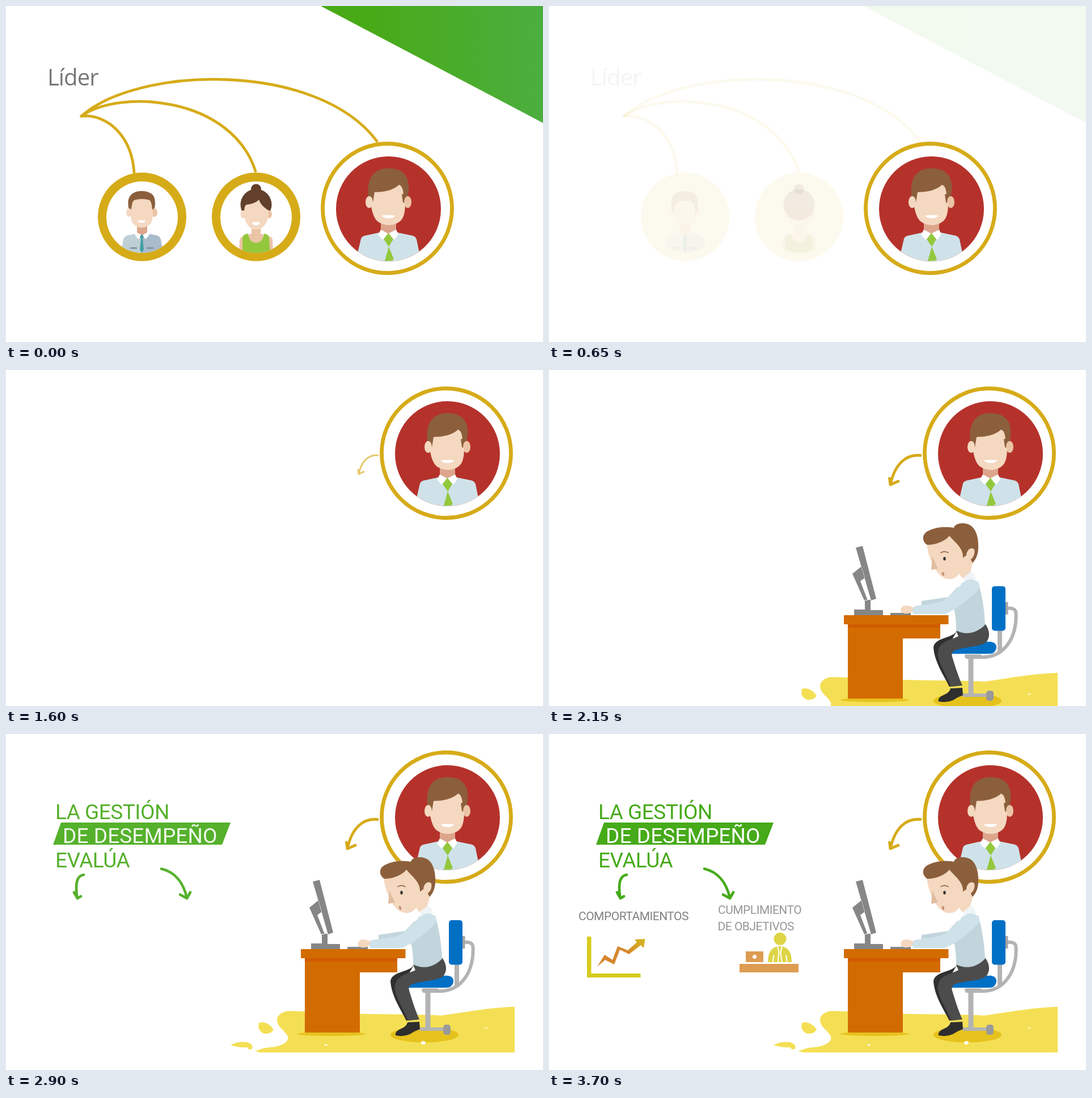
An HTML page for the animation above (3750 ms loop, 947 by 592 pixels).

```html
<!DOCTYPE html>
<html lang="es">
<head>
<meta charset="utf-8">
<title>Gestión de desempeño</title>
<style>
  html, body { margin: 0; width: 100%; height: 100%; overflow: hidden; background: #fff; }
  svg { display: block; width: 947px; height: 592px; }
  .each :not(g) { opacity: var(--o, 1); }
  .line { fill: none; stroke-linecap: round; stroke-linejoin: round; }
  .gold { fill: #d6ab18; }
  .gold.line { fill: none; stroke: #d6ab18; stroke-width: 4.8; }
  .green { fill: #46aa19; }
  .green.line { fill: none; stroke: #46aa19; stroke-width: 4.6; }
  .white { fill: #fff; }
  .skin { fill: #f4d8c0; }
  .ear { fill: #ebc4a6; }
  .neck { fill: #dca58c; }
  .hair { fill: #8c5f3c; }
  .lime { fill: #93c83d; }
  .shirt { fill: #cfe2e9; }
  .fold { fill: #c2d5dc; }
  .desk { fill: #d36c00; }
  .metal { fill: #868686; }
  .blue { fill: #0070c5; }
  .tube { stroke: #b3b3b3; }
  .floor { fill: #f4df54; }
  .shade { fill: #e6c21c; }
  .orange { fill: #d6872d; }
  .yellow { fill: #d6cb1e; }
  text { font-family: Roboto, "Open Sans", sans-serif; }
  .lead { font: 40px "Open Sans", "Noto Sans", sans-serif; letter-spacing: -.9px; fill: #777; }
  .head { font-size: 37px; letter-spacing: -.5px; }
  .head.white { letter-spacing: .1px; }
  .label { font-size: 21px; letter-spacing: -.5px; fill: #808080; }
</style>
</head>
<body>
<svg viewBox="0 0 947 592">
  <defs>
    <linearGradient id="leaf" gradientUnits="userSpaceOnUse" x1="640" y1="0" x2="947" y2="0">
      <stop stop-color="#48aa17"/><stop offset="1" stop-color="#4cae3f"/>
    </linearGradient>
    <linearGradient id="rise" gradientUnits="userSpaceOnUse" x1="135" y1="385" x2="169" y2="361">
      <stop stop-color="#d6872d"/><stop offset="1" stop-color="#d6b81e"/>
    </linearGradient>
    <clipPath id="clipA"><circle cx="240" cy="372" r="63"/></clipPath>
    <clipPath id="clipB"><circle cx="441" cy="372" r="63"/></clipPath>
    <clipPath id="clipC"><circle cx="674.5" cy="357.5" r="92.5"/></clipPath>
  </defs>

  <g id="team" class="each">
    <path fill="url(#leaf)" d="M555 0H947V206Z"/>
    <text class="lead" x="73" y="140">Líder</text>
    <path class="gold line" d="M133 194C180 190 222 230 226 294"/>
    <path class="gold line" d="M133 194C200 146 397 158 440 291"/>
    <path class="gold line" d="M133 194C233 105 548 97 654 238"/>

    <circle class="gold" cx="240" cy="371.5" r="78"/>
    <circle class="white" cx="240" cy="372" r="63"/>
    <g clip-path="url(#clipA)">
      <path class="hair" d="M219 366C214 352 215 342 217 338C221 329 230 326 239 326C250 326 260 330 262 339C264 347 263 357 259 366L256 350L250 343H230L223 350Z"/>
      <ellipse class="skin" cx="217" cy="364" rx="5" ry="7.5"/>
      <ellipse class="ear" cx="262" cy="364" rx="5" ry="7.5"/>
      <path class="neck" d="M231 385H249V400L240 406L231 400Z"/>
      <path class="skin" d="M220 364C222 356 221 346 226 342Q240 338 253 342C258 346 257 356 259 364C259 376 257 383 252 386C245 392 233 392 227 386C222 383 220 376 220 364Z"/>
      <path class="white" d="M232 378Q239 377 246 378Q245 382 239 382Q233 382 232 378Z"/>
      <path fill="#bfcfd6" d="M202 440L207 411Q209 405 215 404L230 401L240 406V440Z"/>
      <path fill="#a9bccc" d="M278 440L273 411Q271 405 265 404L250 401L240 406V440Z"/>
      <path class="white" d="M231 399L227 403L233 411L240 404L246 411L253 403L249 399L240 404Z"/>
      <path fill="#429fa2" d="M239.5 402L243 406L241 410L243 429L239.5 435L236 429L238 410L236 406Z"/>
      <path fill="#8298a6" d="M219 425H231V428H219ZM248 425H260V428H248Z"/>
    </g>

    <circle class="gold" cx="441" cy="371.5" r="78"/>
    <circle class="white" cx="441" cy="372" r="63"/>
    <g clip-path="url(#clipB)" fill="#62402c">
      <circle cx="441" cy="322.5" r="9"/>
      <circle cx="441" cy="350" r="27.5"/>
      <ellipse class="skin" cx="418.5" cy="367" rx="5" ry="7"/>
      <ellipse class="ear" cx="464" cy="367" rx="5" ry="7"/>
      <path class="ear" d="M411 440L412 412Q414 405 424 404L433 401V386H449V401L458 404Q469 405 470 412L471 440Z"/>
      <path class="skin" d="M420 364C420 357 421 352 424 350C434 349 442 346 446 341C449 350 456 356 463 360C464 380 454 394 441 394C428 394 420 380 420 364Z"/>
      <path class="white" d="M434 381Q441 380 448 381Q447 386.5 441 386.5Q435 386.5 434 381Z"/>
      <path class="lime" d="M417 440V408Q418 402 427 401Q429 417 441 417Q453 417 455 401Q463 402 464 408L466 440Z"/>
    </g>
  </g>

  <g id="badge">
    <circle class="white" cx="672.5" cy="356.5" r="114" stroke="#d6ab18" stroke-width="6.8"/>
    <circle fill="#b5322b" cx="674.5" cy="357.5" r="92.5"/>
    <g clip-path="url(#clipC)">
      <path class="neck" d="M661 380H688V398L674 404L661 398Z"/>
      <path class="hair" d="M646 348L639 335C636 303 648 286 675 286C702 286 712 303 710 325L708 340L703 349Z"/>
      <ellipse class="skin" cx="640.5" cy="345.5" rx="6.5" ry="10.5"/>
      <ellipse class="ear" cx="708.5" cy="345.5" rx="6.5" ry="10.5"/>
      <path class="skin" d="M650 328C668 328 684 324 693 315C699 317 700 324 701 331L698 332L700 346L704 348C704 364 701 375 694 380C683 388 667 388 656 380C649 375 645 362 643 347H647Z"/>
      <path class="white" d="M663 369Q675 367.5 686.5 369Q684 374 675 374Q665 374 663 369Z"/>
      <path class="shirt" d="M619 440L626 410Q628 405 636 404L659 399L674 406L690 399L714 404Q722 405 724 411L730 440V455H619Z"/>
      <path class="white" d="M661 394L656 403L664 412L674 401L685 412L692 402L688 394L674 401Z"/>
      <path class="lime" d="M674.5 400L683 411L675 424L666 411ZM675 424L684 446Q681 450 668 449Z"/>
    </g>
  </g>

  <g id="pointer">
    <path class="gold line" d="M655 150.5C630 148 610 165 602 202M600.5 191L602 202L616 196"/>
  </g>

  <g id="office">
    <path class="floor" d="M440 559Q452 553 466 552C484 551 500 543 497 533C492 522 478 517 478 503Q480 491 497 488L540 489C610 495 720 493 767 496C800 492 850 482 897 480.5V561H448Z"/>
    <path class="floor" d="M446 509Q455 506 465 513Q475 522 470 523Q468 528 456 528Q448 526 445 517Z"/>
    <path class="floor" d="M396 548Q410 541 425 543Q437 547 434 554Q431 559 425 552Q410 553 396 548Z"/>
    <ellipse class="shade" cx="574.5" cy="528.5" rx="60.5" ry="3.5"/>
    <ellipse class="shade" cx="738" cy="530" rx="60" ry="13.5"/>
    <g class="white">
      <ellipse cx="564" cy="548" rx="3" ry="1.3"/>
      <ellipse cx="736" cy="544" rx="4" ry="3"/>
      <ellipse cx="847" cy="518" rx="3" ry=".8"/>
    </g>
    <path class="desk" d="M527 395H690V420H624V526H527Z"/>
    <path fill="#cf5b00" d="M527 395H690V401H527Z"/>
    <path class="desk" d="M520 379H704.5V395H520Z"/>
    <path class="metal" d="M541 260L553 257L577 350L568 353ZM551 293L535 306L556 353H562L549 319L557 313ZM557 352H567V370H589V379H538V369H557ZM602 375H638V379H602Z"/>

    <g class="line tube">
      <path stroke-width="6" d="M808 367C827 365 824 376 823 392C819 428 797 453 765 453H737"/>
      <path stroke-width="8" stroke-linecap="butt" d="M795 404V446"/>
      <path stroke-width="9" stroke-linecap="butt" d="M744 450V522"/>
      <path stroke-width="6" d="M732 520H775M736 451H760"/>
    </g>
    <rect x="805" y="356" width="4.5" height="22" fill="#a5a5a5"/>
    <rect class="blue" x="781" y="328" width="24" height="78.5" rx="5"/>
    <rect x="771" y="512" width="13" height="18" rx="5" fill="#999"/>
    <path class="blue" d="M706 447C720 427 770 425 780 426Q790 428 789 437Q787 447 776 447Z"/>

    <path fill="#303030" d="M720 406C712 421 680 417 678 436C680 462 696 485 706 505L718 503L700 440Z"/>
    <path fill="#4c4c4c" d="M718 407L769 394C777 405 778 415 773 424C766 435 745 433 722 439C713 441 709 445 711 452C717 472 723 490 729 503L709 505C699 480 684 460 686 444C688 425 708 423 722 416Z"/>
    <path fill="#2e2e2e" d="M708 508L729 507L730 520Q721 523 712 529Q700 534 687 531Q685 524 697 519Q707 515 708 508Z"/>
    <path class="fold" d="M657 354L704 347L722 328L718 352L700 360L657 363Z"/>
    <path class="fold" d="M728 322L757 320C764 345 768 370 769 396C755 411 735 415 718 406C718 385 716 372 712 362Z"/>
    <path fill="#f0f4f6" d="M727 305L731 316L734 320L753 315L750 307L742 301Z"/>
    <path class="shirt" d="M731 321C742 312 758 315 759 330C754 341 720 368 699 377H643Q636 370 645 363L680 358C702 355 715 337 731 321Z"/>
    <path class="skin" d="M621 374Q618 365 628 362Q637 362 643 366L639 374Q633 377 627 376Z"/>
    <path class="skin" d="M666 245C666 275 680 299 690 309C701 319 717 317 723 306L729 314L743 303L748 284L745 258L706 236Z"/>
    <path class="hair" d="M667 255C657 249 657 235 670 230C685 223 700 223 714 225C716 216 735 214 745 222C755 230 758 247 757 263C756 275 752 281 747 287L742 278L735 274L730 278C731 261 717 252 706 239C700 247 685 255 667 255Z"/>
    <path class="skin" d="M736 277C735 264 744 258 750 263C752 272 747 282 738 283Z"/>
    <ellipse cx="697.5" cy="279.5" rx="2.2" ry="3.2" fill="#333"/>
    <path class="line" stroke="#8c5f3c" stroke-width="1.5" d="M691 269Q697 265 704 269"/>
    <path fill="#e1bd9f" d="M676 276L674 299L686 297Z"/>
    <ellipse cx="695" cy="306.5" rx="2" ry="3.5" fill="#c58f72" transform="rotate(-15 695 306.5)"/>
  </g>

  <g id="goals">
    <text class="label" x="298" y="326">CUMPLIMIENTO</text>
    <text class="label" x="297.5" y="355">DE OBJETIVOS</text>
    <path class="orange" d="M336 414H440V429H336ZM347 392H378V411H347Z"/>
    <circle class="white" cx="362.5" cy="401.5" r="3.5"/>
    <circle class="yellow" cx="407.5" cy="370" r="11"/>
    <path class="yellow" d="M386 411C386 392 394 383 407 383C420 383 428 392 428 411Z"/>
    <path fill="none" stroke="#fff" stroke-width="2" d="M396.5 398L394.5 412M418 398L420 412M403 383L405.5 393L403.5 412M411 383L408.5 393L410.5 412"/>
  </g>

  <g id="title" class="each">
    <path class="green" d="M97 156H396L381 195H83Z"/>
    <text class="head green" x="87" y="149.5">LA GESTIÓN</text>
    <text class="head white" x="100" y="192">DE DESEMPEÑO</text>
    <text class="head green" x="87" y="235">EVALÚA</text>
    <path class="green line" d="M137 248C124 250 122 265 125.5 289M120 279L126 289.5L132 286"/>
    <path class="green line" d="M274 237.5C298 243 313 262 319 289M307 283L319 289.5L325 279"/>
  </g>

  <g id="habits">
    <text class="label" x="52" y="328">COMPORTAMIENTOS</text>
    <path class="yellow" d="M67 357H74.5V422H161.5V429H67Z"/>
    <path fill="url(#rise)" d="M85 410L98 389L112 398L121 374L139 381L155 367L151 362L169.5 361L167 377L162 372L141 388L125 380L115 406L99 398Z"/>
  </g>
</svg>
<script>
  const LOOP = 3750, STEP = 50, DROP = 49;
  const el = id => document.getElementById(id);
  const place = (id, x, y, scale = '') => el(id).setAttribute('transform', `translate(${x} ${y})${scale}`);
  const fade = (id, o) => el(id).setAttribute('opacity', o);
  const parts = (id, o) => el(id).style.setProperty('--o', o);

  function floatDown(id, u) {
    fade(id, u);
    place(id, 0, -DROP * (1 - u));
  }

  function draw(t) {
    const ramp = (start, length) => Math.min(1, Math.max(0, (t - start) / length));

    parts('team', 1 - ramp(0, 700));

    const m = ramp(700, 750), ease = m * m * (3 - 2 * m);
    place('badge', 104 * ease, -210 * ease);

    const a = ramp(1250, 550);
    fade('pointer', a);
    place('pointer', 657 * (1 - a), 150 * (1 - a), ` scale(${a})`);

    const rise = ramp(1800, 550);
    place('office', 0, 400 * (1 - rise) ** 2);
    fade('office', rise > 0 ? 1 : 0);

    parts('title', ramp(2350, 600));
    floatDown('habits', ramp(2900, 550));
    floatDown('goals', ramp(3250, 550));
  }

  const start = performance.now();
  function tick() {
    const t = Math.floor((performance.now() - start) % LOOP / STEP) * STEP;
    draw(t < 2 * STEP ? 0 : t);
    requestAnimationFrame(tick);
  }
  tick();
</script>
</body>
</html>
```
